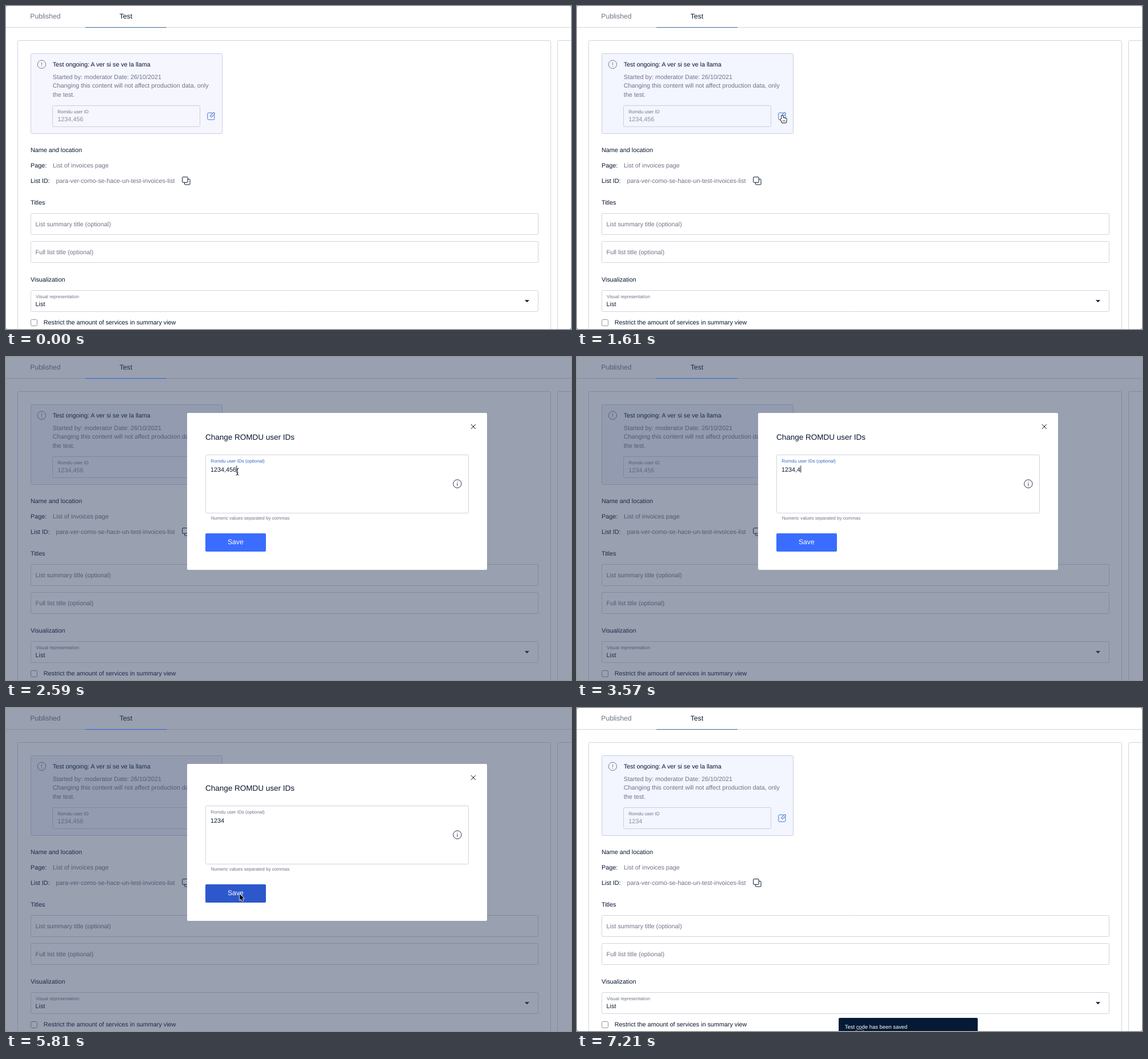
Recreate the animation shown at these times as an HTML page with a canvas. Size 989 by 566 pixels, loop 7.28 s.

```html
<!DOCTYPE html>
<html lang="en">
<head>
<meta charset="utf-8">
<title>Test user IDs</title>
<style>
html, body { margin: 0; width: 100%; height: 100%; overflow: hidden; background: #fff; }
canvas { display: block; width: 989px; height: 566px; }
</style>
</head>
<body>
<canvas id="stage"></canvas>
<script>
const W = 989, H = 566, LOOP = 7280, STEP = 70;
const OPEN = 1680, FOCUS = 2590, TYPE = 3290, BACK = 4550, BLUR = 5600, CLOSE = 5880, TOAST = 6020;
const KEY = 180, BLINK = 490;
const INK = '#071731', GRAY = '#6f7488', LINE = '#d2d4dc', BLUE = '#3a6dff', EDIT = '#3d78d6';
const FONT = '"Liberation Sans", Arial, sans-serif';
const BODY = 10.8, SMALL = 8.1, LARGE = 12.15;
const LEFT = 43, WIDE = 888;
const AREA = [349, 171, 460, 102], SAVE = [349, 309, 106, 32], PEN = [352, 186, 14, 14];

const canvas = document.getElementById('stage');
const dpr = window.devicePixelRatio || 1;
canvas.width = W * dpr;
canvas.height = H * dpr;
const c = canvas.getContext('2d');
c.scale(dpr, dpr);

const ease = k => k * k * (3 - 2 * k);
const inside = (p, [x, y, w, h]) => p && p.x > x && p.x < x + w && p.y > y && p.y < y + h;

function text(s, x, y, size = BODY, color = INK, align = 'left') {
  c.font = size + 'px ' + FONT;
  c.fillStyle = color;
  c.textAlign = align;
  c.fillText(s, x, y);
}

function paint(fill, stroke, width = 1) {
  if (fill) { c.fillStyle = fill; c.fill(); }
  if (stroke) { c.strokeStyle = stroke; c.lineWidth = width; c.stroke(); }
}

function box(x, y, w, h, r, fill, stroke) {
  c.beginPath();
  c.roundRect(x, y, w, h, r);
  paint(fill, stroke);
}

// Outline on the pixel grid
const frame = (x, y, w, h, color = LINE, fill = null) => box(x + 0.5, y + 0.5, w, h, 2, fill, color);

function line(x1, y1, x2, y2, color, width = 1) {
  c.beginPath();
  c.moveTo(x1, y1);
  c.lineTo(x2, y2);
  paint(null, color, width);
}

// Circle with an "i", or with "!" when turned over
function badge(x, y, color, flip) {
  c.save();
  c.translate(x, y);
  c.scale(1, flip ? -1 : 1);
  c.beginPath();
  c.arc(0, 0, 7.2, 0, 7);
  paint(null, color);
  line(0, -1.2, 0, 3.6, color);
  line(0, -3.8, 0, -2.6, color);
  c.restore();
}

function editIcon(back) {
  c.save();
  c.translate(358.8, 193.2);
  box(-6, -6, 12, 12, 1.5, null, EDIT);
  c.translate(2.4, -2.2);
  c.rotate(Math.PI / 4);
  box(-2.6, -6, 5.2, 11, 1, back);
  box(-1.6, -5, 3.2, 9, 0.8, back, EDIT);
  c.restore();
}

function alertBox(t) {
  const back = t < 1610 ? '#f6f6fe' : '#f3f5ff';
  const edge = '#cbcedd', x = 81.7;
  frame(LEFT, 83, 335, 140, edge, back);
  badge(62.4, 102.3, '#777b8b', true);
  text('Test ongoing: A ver si se ve la llama', x, 105.6);
  const lines = [
    'Started by: moderator Date: 26/10/2021',
    'Changing this content will not affect production data, only',
    'the test.'
  ];
  lines.forEach((s, i) => text(s, x, 127.5 + 15.8 * i, BODY, GRAY));
  frame(81, 174, 258, 37, edge);
  text('Romdu user ID', 90.2, 188.3, SMALL, GRAY);
  text(t < CLOSE ? '1234,456' : '1234', 90.2, 202, BODY, '#8b8f9f');
  editIcon(back);
}

function tabLine(color) {
  c.fillStyle = color;
  c.fillRect(139, 37, 142, 1);
}

function input(y, label) {
  frame(LEFT, y, WIDE, 37);
  text(label, 51.6, y + 23, BODY, GRAY);
}

function detail(y, name, value) {
  text(name, LEFT, y);
  text(value, LEFT + c.measureText(name).width + 10.8, y, BODY, GRAY);
}

function page(t) {
  c.fillStyle = '#fff';
  c.fillRect(0, 0, W, H);
  text('Published', 42.3, 22, LARGE, GRAY);
  text('Test', 198.8, 22, LARGE);
  line(0, 37.5, W, 37.5, LINE);
  tabLine('#3f6a91');

  frame(20, 60, 933, H);
  frame(965, 60, W, H);
  alertBox(t);

  text('Name and location', LEFT, 256);
  detail(283.2, 'Page:', 'List of invoices page');
  detail(310.4, 'List ID:', 'para-ver-como-se-hace-un-test-invoices-list');
  box(312.5, 303.5, 9.5, 9.5, 1, null, INK);
  box(308.7, 299.7, 9.5, 9.5, 1, '#fff', INK);

  text('Titles', LEFT, 347.8);
  input(363, 'List summary title (optional)');
  input(412, 'Full list title (optional)');

  text('Visualization', LEFT, 482.6);
  frame(LEFT, 498, WIDE, 37);
  text('Visual representation', 52, 512.2, SMALL, GRAY);
  text('List', 51.6, 526.2);
  c.beginPath();
  c.moveTo(908, 515.2);
  c.lineTo(916, 515.2);
  c.lineTo(912, 519.2);
  paint(INK);
  frame(LEFT, 549, 11, 11, '#8e92a0');
  text('Restrict the amount of services in summary view', 65.8, 558);
}

function modal(t, p) {
  c.fillStyle = 'rgba(52, 66, 98, 0.5)';
  c.fillRect(0, 0, W, H);
  tabLine('#2d62e2');

  box(317, 98, 525, 275, 2, '#fff');
  for (const s of [-4, 4]) line(814, 122 - s, 822, 122 + s, INK);
  text('Change ROMDU user IDs', 349, 144.5, 13.5);

  const focus = t >= FOCUS && t < BLUR;
  frame(...AREA);
  text('Romdu user IDs (optional)', 358.3, 185.4, SMALL, focus ? '#2f69c8' : GRAY);

  // Four key presses take away ",456"
  const gone = Math.max(0, Math.min(4, Math.floor((t - TYPE) / KEY) + 1));
  text('1234,456'.slice(0, 8 - gone), 358, 200.6);
  const since = t - (gone ? TYPE + KEY * (gone - 1) : FOCUS);
  if (focus && since % (2 * BLINK) < BLINK) {
    c.fillRect(358.2 + c.measureText('1234,456'.slice(0, 8 - gone)).width, 190.5, 1, 12);
  }
  badge(790, 222.2, '#2a3347');
  text('Numeric values separated by commas', 358.7, 284.8, SMALL, GRAY);

  box(...SAVE, 2, inside(p, SAVE) ? '#2d58cc' : BLUE);
  text('Save', 401.8, 328.3, LARGE, '#fff', 'center');
}

function toast(t) {
  if (t <= TOAST) return;
  const k = Math.min(1, (t - TOAST) / 350);
  const y = 543 + 23 * (1 - k) ** 2;
  box(458, y, 243.5, 40, 2, '#041a35');
  text('Test code has been saved', 468.7, y + 19.4, 9.45, '#fff');
  if (t < 7070) return;
  c.beginPath();
  c.arc(495, 574.5, 11.5, 0, 7);
  paint(null, '#9298a4');
}

// Each move: start time, end time, place reached
const moves = [
  [70, 840, 370, 202],
  [840, 1260, 359.5, 192],
  [2030, 2240, 420, 201],
  [2450, FOCUS, 405, 201],
  [BACK, 5320, 409, 326],
  [TOAST, 6440, 492, 580]
];

function pointer(t) {
  if (t < 70 || (t >= TYPE && t < BACK)) return null;
  const p = { x: 437, y: 318 };
  for (const [from, to, x, y] of moves) {
    const k = ease(Math.max(0, Math.min(1, (t - from) / (to - from))));
    p.x += (x - p.x) * k;
    p.y += (y - p.y) * k;
  }
  return p;
}

const shapes = {
  arrow() {
    c.beginPath();
    c.moveTo(0, 0);
    c.lineTo(0, 10.6);
    c.lineTo(2.4, 8.4);
    c.lineTo(4.1, 12.2);
    c.lineTo(6, 11.4);
    c.lineTo(4.4, 7.7);
    c.lineTo(7.6, 7.5);
    c.closePath();
    c.lineJoin = 'round';
    paint(null, '#fff', 1.6);
    paint('#000');
  },
  hand() {
    const parts = () => {
      c.beginPath();
      c.roundRect(-1.2, 0, 2.4, 9, 1.2);
      for (let i = 1; i < 4; i++) c.roundRect(2 * i - 1.2, 3.5 + i / 2, 2.4, 5, 1.2);
      c.roundRect(-3.4, 6, 3.4, 3, 1.5);
      c.roundRect(-1.2, 6, 8, 6.6, 2);
    };
    parts();
    paint(null, '#111', 1.8);
    paint('#fff');
    for (let i = 0; i < 3; i++) line(1.2 + 1.6 * i, 8, 1.2 + 1.6 * i, 10.6, '#333', 0.7);
  },
  beam() {
    c.beginPath();
    for (const s of [-1, 1]) {
      c.moveTo(-2.5, 6 * s);
      c.quadraticCurveTo(0, 6 * s, 0, 4 * s);
      c.quadraticCurveTo(0, 6 * s, 2.5, 6 * s);
    }
    c.moveTo(0, -4.8);
    c.lineTo(0, 4.8);
    c.moveTo(-1.5, 2);
    c.lineTo(1.5, 2);
    paint(null, '#fff', 2.2);
    paint(null, '#111');
  }
};

function drawPointer(p, open) {
  if (!p) return;
  const shape = open ? (inside(p, AREA) ? 'beam' : 'arrow') : (inside(p, PEN) ? 'hand' : 'arrow');
  c.save();
  c.translate(p.x, p.y);
  shapes[shape]();
  c.restore();
}

function corners() {
  c.beginPath();
  c.rect(0, 0, W, H);
  c.roundRect(0, 0, W, H, 3);
  c.fillStyle = '#888';
  c.fill('evenodd');
}

function draw(now) {
  const t = Math.floor((now % LOOP) / STEP) * STEP;
  const p = pointer(t);
  const open = t >= OPEN && t < CLOSE;
  c.textRendering = 'geometricPrecision';
  page(t);
  if (open) modal(t, p);
  toast(t);
  drawPointer(p, open);
  corners();
}

const start = performance.now();
function tick() {
  draw(performance.now() - start);
  requestAnimationFrame(tick);
}
tick();
</script>
</body>
</html>
```
